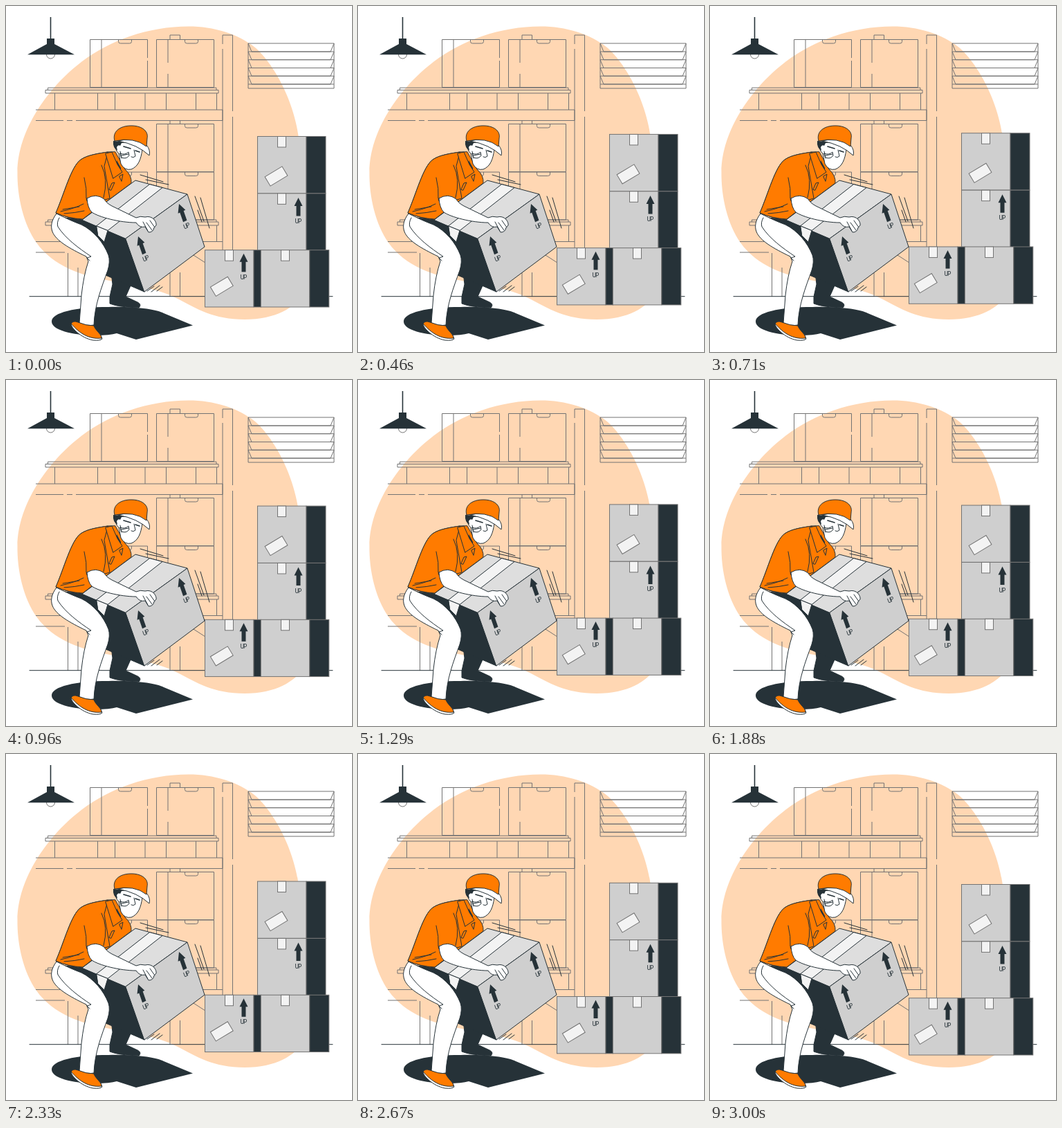
Animation of 500x500 px, one loop 3.04 s. Source, as an HTML page:

```html
<!DOCTYPE html>
<html lang="en">
<head>
<meta charset="utf-8">
<title>Warehouse</title>
<style>
  html, body { margin: 0; width: 100%; height: 100%; overflow: hidden; background: #fff; }
  svg { display: block; width: 100%; height: 100%; }
  text { font: 500 9.5px "Noto Sans Mono", "Liberation Mono", monospace; font-stretch: extra-condensed; letter-spacing: -1.5px; text-anchor: middle; stroke: none; }
  .grey { stroke: #737373; fill: none; }
  .ink { stroke: #263238; stroke-linecap: round; stroke-linejoin: round; }
  .dark { fill: #263238; }
  .orange { fill: #ff7b00; }
  .white { fill: #fff; }
  .card { fill: #cfcfcf; }
  .tape { fill: #f3f3f3; }
  .none { fill: none; }
</style>
</head>
<body>
<svg viewBox="0 0 500 500">
  <defs>
    <g id="up" class="dark" stroke="none">
      <path d="M0 0L6 12H3V26.500H-3V12H-6Z"/>
      <text x="-.7" y="37">UP</text>
    </g>
    <g id="crate">
      <path d="M0 0H83V69H0ZM16.500 0V69M41 0V3Q41 5.500 44 5.500H57Q60 5.500 60 3V0"/>
    </g>
    <path id="label" class="tape" d="M-14.500 -7.700H14.500V7.700H-14.500Z"/>
  </defs>

  <path fill="#ffd7b3" d="M264 29.500C300 29.500 335 40 360 60C390 86 424 150 425 215C425 255 440 290 448 340C455 385 435 453 345 453C300 453 275 437 250 424C215 405 180 405 150 397C110 390 68 376 44 342C25 315 16 275 16.500 240C17 180 60 118 110 80C150 50 205 29.500 264 29.500Z"/>

  <!-- shelves -->
  <g class="grey">
    <use href="#crate" x="121.500" y="48.500"/>
    <use href="#crate" x="217.500" y="48.500"/>
    <use href="#crate" x="217.500" y="170.500"/>
    <use href="#crate" x="217.500" y="240"/>
    <use href="#crate" x="121.500" y="240"/>
    <path stroke="#ffd7b3" stroke-width="2" d="M204.500 75V79M234 82V98"/>
    <path d="M237 48.500V42H251.500V48.500M237 170.500V165.500M251.500 170.500V165.500M237 385V420M251.500 385V420"/>
    <path d="M313 55V42H327.500V152M327.500 160V420M313 62V420"/>
    <path d="M43 150H313M43 165.500H83M88 165.500H96M101 165.500H313V150"/>
    <path d="M57 121.500H307V126H57ZM60.500 121.500V118.200H304V121.500M70.500 126V150M132.500 126V150M157.500 126V150M201 126V150M231.500 126V150M274.500 126V150M304.500 126V150"/>
    <path d="M57 312H307V317H57ZM60.500 312V309H304V312M304.500 317V341M43 340.500H80M43 356H85M265 340.500H313M89.500 357V420M104 378V420M271 360L288 371"/>
  </g>

  <!-- blinds -->
  <g class="grey">
    <path d="M350 54H474V119H350Z"/>
    <path d="M350 54L355 66H469L474 54M350 66L355 77.700H469L474 66M350 77.700L355 89.500H469L474 77.700M350 89.500L355 101.200H469L474 89.500M350 101.200L355 113H469L474 101.200"/>
    <path d="M350 66H474M350 77.700H474M350 89.500H474M350 101.200H474M350 113H474"/>
  </g>

  <!-- lamp -->
  <circle class="grey" cx="64.500" cy="70" r="6"/>
  <path class="dark" d="M63.700 16H65.300V47H70V55L99 70.300H31L59 55V47H63.700Z"/>

  <path class="ink" d="M34 419.700H472"/>
  <path class="dark" d="M66 456C66 443 100 435 148 435C190 434 218 439 228 444L270 461.500L188 482L160 473Q150 476 130 476C95 476 66 468 66 456Z"/>

  <g id="stack" class="grey"></g>

  <!-- far leg and carried box -->
  <path class="dark ink" d="M152 385L154 402L150 420V430C160 434 172 435 192 436C196 432 193 429 188 427L173 420L181 402Z"/>
  <path class="dark" d="M78 305L112 308L150 345L150 386L137 386L100 340Z"/>
  <g class="ink" stroke-width="1">
    <path class="orange" d="M147 211C135 213 118 215 108 222C94 232 84 272 72 299Q90 307 110 309L181 256Q182 245 172 236L158 211Z"/>
    <path class="dark" d="M110 309L173 336L200 413L137 386Z"/>
    <path fill="#dedede" d="M110 309L187 252L262 272L173 336Z"/>
    <path class="card" d="M173 336L262 272L287 348L200 413Z"/>
    <path class="tape" d="M208 257.700L226 262.500L147 324.500L131 318Z"/>
    <path class="tape" d="M131 318L147 324.500L142 341L133 332Z"/>
    <path class="none" d="M194 244L227 254M202 251L235 258M273 275L286 311M277 295L283 312M281 277L294 321M204 412L214 405M210 413L222 404M218 412L226 406"/>
  </g>
  <use href="#up" transform="matrix(.9 -.42 .33 .94 191 333)"/>
  <use href="#up" transform="matrix(.9 -.42 .33 .94 250 286)"/>

  <!-- worker -->
  <g class="ink" stroke-width="1">
    <path class="white" d="M73 300C66 309 64 318 67 326C72 339 91 350 116 362L119 369Q112 390 109 418L106 458Q117 463 127 461C128 432 138 407 147 382Q151 369 148 360C141 342 127 325 109 316Q95 311 73 300Z"/>
    <path class="none" d="M77 306Q73 313 75 319C86 336 105 350 123 362L117 364L121 368"/>
    <path class="white" d="M94 459C93 464 108 480 126 483Q136 484 139 481L136 474Z"/>
    <path class="orange" d="M94 459Q97 454 104 457Q116 462 127 462C129 469 139 475 138 480C120 482 106 473 94 459Z"/>

    <path class="orange" d="M147 211C135 213 118 215 108 222C94 232 84 272 72 299Q90 307 111 308L124 298L116 279Q128 271 143 280L150 278L142 232Z"/>
    <path class="none" d="M113 248Q117 264 116 278M138 230Q148 250 141 277M79 297Q98 293 112 286M82 294L106 290M84 300Q100 299 113 296"/>

    <path class="white" d="M117 278Q130 270 142 279Q144 284 153 289L188 306Q194 303 201 305C212 302 218 312 217 317L214 320Q213 327 206 327L201 319Q193 321 188 313C164 313 134 305 124 298Q118 292 117 278Z"/>
    <path class="none" d="M203 313L211 324M208 310L215 320M198 312L205 325"/>

    <path class="white" d="M160 198C157 206 160 211 163 213L166 228Q171 238 181 236C191 232 195 222 197 207L183 197Z"/>
    <path class="dark" stroke="none" d="M155 195L168 196L165 202Q162 200 160 204L161 209Q154 205 155 195Z"/>
    <path class="dark" stroke="none" d="M160 223L166 234L166 239L159 230Z"/>
    <path class="orange" d="M144 213L153 211L161 229L168 240L155 249Z"/>
    <path class="orange" d="M164 246L169 243L167 253Z"/>
    <path class="none" d="M149 265L153 256L157 255L152 266Z"/>
    <path class="white" d="M165 213Q172 216 177 211L178 216Q174 222 167 219Z"/>
    <path class="none" d="M167 216L177 214M165 210L167 220M185 208L187 217Q184 220 181 218"/>
    <path class="none" stroke-width="1.700" d="M170 203L180 206M187 209L193 211"/>
    <path class="white" d="M162 195Q188 188 203 201Q209 208 207 216Q190 200 162 195Z"/>
    <path class="orange" d="M157 195C153 182 164 173 181 173C198 173 206 182 204 191L203 203Q186 189 157 195Z"/>
  </g>
</svg>
<script>
  const rect = (x, y, w, h, name) => `<rect class="${name}" x="${x}" y="${y}" width="${w}" height="${h}"/>`;
  const box = (x, y, front, side, tape) =>
    rect(x, y, front, 82.3, "card") + rect(x + front, y, side, 82.3, "dark") + rect(tape, y, 12, 15.5, "tape");
  const use = (id, transform) => `<use href="#${id}" transform="${transform}"/>`;

  const stack = document.getElementById("stack");
  stack.innerHTML =
    box(363.5, 188.5, 70.5, 28, 392.5) +
    box(363.5, 270.9, 70.5, 28, 392.5) +
    box(287.5, 352.7, 70.5, 10.5, 316.5) +
    box(368.3, 352.7, 70.5, 28, 397.5) +
    use("label", "translate(390.5 246) rotate(-31)") +
    use("label", "translate(311.8 405.3) rotate(-31)") +
    use("up", "translate(422.5 277)") +
    use("up", "translate(343.5 357.7)");

  // The stack floats 10 px up and back at a steady pace, then rests briefly.
  const LOOP = 3040, FLOAT = 3000, start = performance.now();
  function draw(now) {
    const p = Math.min(1, Math.max(0, now - start) % LOOP / FLOAT);
    const lift = 10 * (1 - Math.abs(2 * p - 1));
    stack.setAttribute("transform", `translate(0 ${-lift})`);
    requestAnimationFrame(draw);
  }
  draw(start);
</script>
</body>
</html>
```
